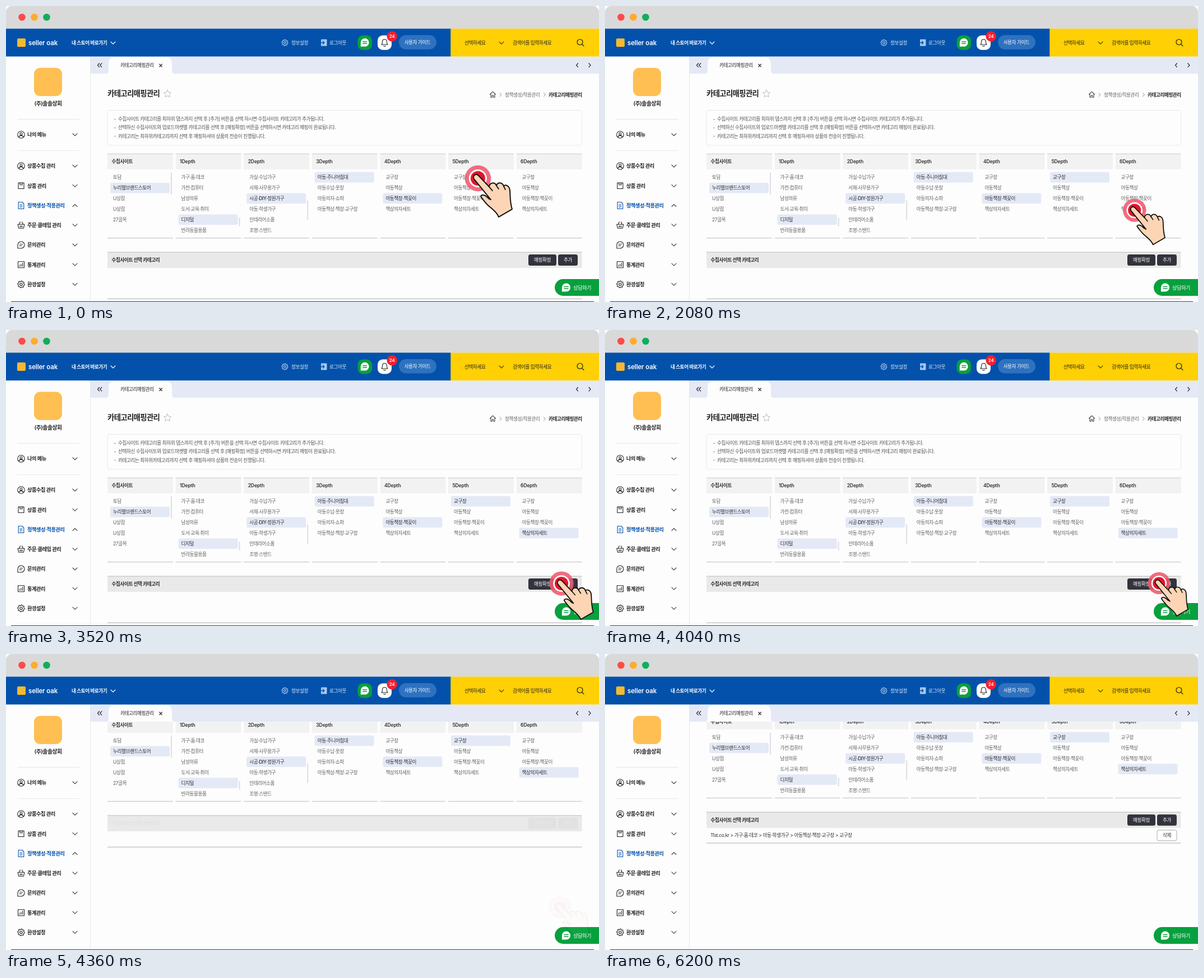
An HTML page that plays this animation: 1058 px wide and 529 px high, repeating every 6.22 s.

```html
<!DOCTYPE html>
<html lang="ko">
<head>
<meta charset="utf-8">
<style>
html, body { margin: 0; width: 100%; height: 100%; overflow: hidden; background: #fff; }
svg { display: block; width: 100vw; height: 100vh; }
text { font-family: Inter, "Noto Sans CJK KR", "Noto Sans KR", "Noto Sans CJK", sans-serif; letter-spacing: -.05em; white-space: pre; }
.line { fill: none; stroke-linecap: round; stroke-linejoin: round; }
</style>
</head>
<body>
<svg id="stage" viewBox="0 0 1058 529"></svg>
<script>
const LOOP = 6220;
const BLUE = '#0351ab', GREEN = '#08a03e', INK = '#222';

// ---------- drawing helpers ----------
const text = (x, y, s, { size = 8.6, fill = INK, weight = 400, anchor = 'start', gap } = {}) =>
  `<text x="${x}" y="${y + size * 0.36}" font-size="${size}" fill="${fill}" font-weight="${weight}" text-anchor="${anchor}"${gap === undefined ? '' : ` style="letter-spacing:${gap}em"`}>${s.replace(/>/g, '&gt;')}</text>`;
const box = (x, y, w, h, fill, r = 0, more = '') =>
  `<rect x="${x}" y="${y}" width="${w}" height="${h}" rx="${r}" fill="${fill}" ${more}/>`;
const dot = (x, y, r, fill, more = '') => `<circle cx="${x}" cy="${y}" r="${r}" fill="${fill}" ${more}/>`;
const line = (d, color = INK, w = 1.1) => `<path class="line" d="${d}" stroke="${color}" stroke-width="${w}"/>`;
const at = (x, y, s) => `<g transform="translate(${x} ${y})">${s}</g>`;
const group = (id, s, more = '') => `<g id="${id}" ${more}>${s}</g>`;
const chevron = (x, y, color, up, w = 4) =>
  line(`M${x - w} ${y + (up ? 2 : -2)}l${w} ${up ? -4 : 4}l${w} ${up ? 4 : -4}`, color);

const gear = (r, color) => {
  const teeth = Array.from({ length: 48 }, (_, i) => {
    const a = i / 48 * 2 * Math.PI, q = r * (i % 6 < 3 ? 1 : 0.8);
    return `${(q * Math.cos(a)).toFixed(2)} ${(q * Math.sin(a)).toFixed(2)}`;
  });
  return line(`M${teeth.join('L')}Z`, color) + dot(0, 0, r * 0.35, 'none', `stroke="${color}" stroke-width="1.1"`);
};

const bubble = (x, y, r) => at(x, y,
  `<path d="M${-r} 0a${r} ${r} 0 1 1 ${r} ${r}H${-r}Z" fill="#fff"/>` +
  line(`M${-r * 0.45} ${-r * 0.2}h${r * 0.9}M${-r * 0.45} ${r * 0.25}h${r * 0.9}`, GREEN, 1.5));

const ring = r => dot(0, 0, r, 'none', `stroke="${INK}" stroke-width="1.1"`);
const icons = {
  user: ring(6.3) + line('M-2-1.5a2 2 0 1 0 4 0a2 2 0 1 0-4 0M-4 4.4c1-4 7-4 8 0'),
  pack: line('M-5-5.2h10v10.4h-10zM-2-5v3.5h4v-3.5'),
  doc: line('M-4.8-6h6.6l3 3v9h-9.6zM-2-1.5h4M-2 1h4M-2 3.5h2.5', BLUE),
  cart: line('M-6-1.5h12l-1.6 7h-8.8zM-3.5-1.5l2-4.5M3.5-1.5l-2-4.5M-2 1v2.5M0 1v2.5M2 1v2.5'),
  talk: line('M-6 0a6 6 0 1 1 6 6h-6zM-2.6-1.3h5.2M-2.6 1.5h3.6'),
  chart: line('M-5.5-5.5h11v11h-11zM-2.7 3v-2.2M0 3v-4M2.7 3v-6'),
  gear: gear(6.2, INK),
};

// ---------- window frame and top bar ----------
const topBar = () =>
  box(0, 0, 1058, 40.5, '#d9d9d9') +
  dot(28.5, 20, 6.3, '#ff4a48') + dot(50.5, 20, 6.3, '#ffab2e') + dot(72.5, 20, 6.3, '#0fae5b') +
  box(0, 40.5, 794, 50, BLUE) + box(793.3, 40.5, 264.7, 50, '#ffd003') +
  box(20, 58, 15, 15, '#f7b92f', 2) +
  text(40, 65.5, 'seller oak', { size: 11.4, fill: '#fff', weight: 600, gap: -0.01 }) +
  text(117, 65.5, '내 스토어 바로가기', { fill: '#fff', weight: 600 }) + chevron(191, 66, '#fff') +
  at(497.5, 65.5, gear(5.4, '#a9c7ec')) + text(509, 65.5, '정보설정', { fill: '#dce8f7' }) +
  box(562, 59.5, 10.5, 12, '#a9c7ec', 1) + line('M560 65.5h8m-2.5-2.5l2.5 2.5l-2.5 2.5', BLUE, 1.3) +
  text(577, 65.5, '로그아웃', { fill: '#dce8f7' }) +
  box(627.5, 52.5, 25.5, 26, GREEN, 9.5) + bubble(640.2, 65.2, 7.4) +
  box(663, 52.5, 25, 26, '#fff', 9) +
  at(675.5, 65.5, line('M-5.5 3.5c1.6-1.4 1.4-3 1.5-5c.3-6 7.7-6 8 0c.1 2-.1 3.6 1.5 5zM-1.7 5.8c.8 1 2.6 1 3.4 0')) +
  dot(688.7, 54.2, 9.2, '#f5202f') + text(688.7, 54.2, '24', { size: 7.8, fill: '#fff', weight: 600, anchor: 'middle', gap: 0 }) +
  box(701, 52, 67, 25.5, '#2e72bf', 12.7) + text(734, 65, '사용자 가이드', { fill: '#fff', weight: 500, anchor: 'middle' }) +
  text(818, 65.5, '선택하세요', { weight: 500 }) + chevron(884, 66, '#554400') +
  text(904, 65.5, '검색어를 입력하세요', { weight: 500 }) +
  dot(1024, 64.5, 5, 'none', `stroke="${INK}" stroke-width="1.2"`) + line('M1027.7 68.3l3.2 3.2', INK, 1.2);

// ---------- sidebar ----------
const menu = [
  [230, 'user', '나의 메뉴'], [286, 'user', '상품수집 관리'], [321.3, 'pack', '상품 관리'],
  [356.5, 'doc', '정책생성·적용관리'], [391.7, 'cart', '주문·클레임 관리'],
  [427, 'talk', '문의관리'], [462.2, 'chart', '통계관리'], [497.4, 'gear', '환경설정'],
];
const sidebar = () =>
  box(0, 90.5, 150, 437.5, '#fdfdfd') + box(150, 90.5, 1, 437.5, '#e8e8ea') +
  box(50, 110.5, 50, 50.5, '#ffbf52', 11) +
  text(75, 174.5, '(주)솔솔상회', { size: 9.8, weight: 600, anchor: 'middle' }) +
  box(20, 202, 111, 0.9, '#e4e4e4') + box(20, 258.3, 111, 0.9, '#e4e4e4') +
  menu.map(([y, icon, label]) => {
    const open = icon === 'doc';
    return at(27, y, icons[icon]) +
      text(38, y, label, { size: 9.2, weight: 600, fill: open ? BLUE : INK }) +
      chevron(123, y, '#444', open);
  }).join('');

const tabs = () =>
  box(151, 90.5, 907, 30.5, '#e4e9f5') +
  '<path d="M178 121q5 0 5-6v-13q0-10.5 10-10.5h93q10 0 10 10.5v13q0 6 5 6z" fill="#fdfdfd"/>' +
  line('M166.5 102.5l-3 3.3l3 3.3M170.7 102.5l-3 3.3l3 3.3', INK, 1.2) +
  text(204, 106, '카테고리매핑관리', { weight: 500 }) +
  line('M273.8 104l4.6 4.6m0-4.6l-4.6 4.6', INK, 1.2) +
  line('M1020.5 102.5l-3 3.3l3 3.3M1040 102.5l3 3.3l-3 3.3', INK, 1.2);

// ---------- page ----------
const starPath = 'M' + Array.from({ length: 10 }, (_, i) => {
  const r = i % 2 ? 3.5 : 7, a = (i * 36 - 90) * Math.PI / 180;
  return `${(r * Math.cos(a)).toFixed(2)} ${(r * Math.sin(a)).toFixed(2)}`;
}).join('L') + 'Z';

const notes = [
  '수집사이트 카테고리를 최하위 뎁스까지 선택 후 [추가] 버튼을 선택 하시면 수집사이트 카테고리가 추가됩니다.',
  '선택하신 수집사이트와 업로드마켓별 카테고리를 선택 후 [매핑확정] 버튼을 선택하시면 카테고리 매핑이 완료됩니다.',
  '카테고리는 최하위카테고리까지 선택 후 매핑하셔야 상품의 전송이 진행됩니다.',
];
const shelf = ['교구장', '아동책상', '아동책장·책꽂이', '책상의자세트'];
const columns = [
  { head: '수집사이트', rows: ['토담', '누리별브랜드스토어', 'U상점', 'U상점', '27골목'], pick: 1, bar: [297, 40] },
  { head: '1Depth', rows: ['가구·홈·데코', '가전·컴퓨터', '남성의류', '도서·교육·취미', '디지털', '반려동물용품'], pick: 4, bar: [378, 16] },
  { head: '2Depth', rows: ['거실·수납가구', '서재·사무용가구', '시공·DIY·정원가구', '아동·학생가구', '인테리어소품', '조명·스탠드'], pick: 2, bar: [347, 35] },
  { head: '3Depth', rows: ['아동·주니어침대', '아동수납·옷장', '아동의자·쇼파', '아동책상·책장·교구장'], pick: 0 },
  { head: '4Depth', rows: shelf, pick: 2 },
  { head: '5Depth', rows: shelf, pick: 0, id: 'pick5' },
  { head: '6Depth', rows: shelf, pick: 3, id: 'pick6' },
];
const rowY = i => 306.3 + i * 18.9;

const column = ({ head, rows, pick, bar, id }, i) => {
  const x = 181 + i * 121.6;
  const chosen = box(x + 5, rowY(pick) - 9.5, 106, 18.7, '#e4e9f6', 3) +
    text(x + 10, rowY(pick), rows[pick], { fill: '#2c2c2c', weight: 500 });
  return box(x, 264, 117, 28, '#f2f2f2') + box(x, 263.7, 117, 1, '#c9c9c9') +
    text(x + 7.5, 278.3, head, { fill: '#333', weight: 600, gap: i ? -0.02 : undefined }) +
    rows.map((r, j) => j === pick && !id ? '' : text(x + 10, rowY(j), r, { fill: '#606060' })).join('') +
    (id ? group(id, chosen) : chosen) +
    (bar ? box(x + 113, bar[0], 2, bar[1], '#dedee2', 1) : '') +
    box(x, 414, 117, 1.3, '#cbcbcb');
};

const button = (x, w, label) => box(x, 444, w, 20, '#32333c', 3.5) +
  text(x + w / 2, 454, label, { fill: '#fff', weight: 500, anchor: 'middle' });

const page = () =>
  text(181, 156.5, '카테고리매핑관리', { size: 13.4, weight: 600 }) +
  at(288, 157, line(starPath, '#b9b9b9', 1)) +
  line('M863.5 158l5-4.8l5 4.8M865 157v6.2h2.3v-3.4h2.4v3.4h2.3v-6.2', '#444') +
  line('M881 155.5l3 3l-3 3M959.5 155.5l3 3l-3 3', '#888', 1) +
  text(890, 158.5, '정책생성/적용관리', { fill: '#666' }) + text(968, 158.5, '카테고리매핑관리', { weight: 600 }) +
  box(181, 186.5, 846.5, 62.5, 'none', 3, 'stroke="#e9e9e9"') +
  notes.map((n, i) => dot(194.5, 202.6 + i * 15.1, 0.8, '#555') + text(200, 202.3 + i * 15.1, n, { fill: '#505050' })).join('') +
  columns.map(column).join('') +
  box(181, 440, 846.5, 28, '#e9e9e9') + box(181, 439.5, 846.5, 1, '#bcbcbc') +
  group('tools', text(188.5, 454, '수집사이트 선택 카테고리', { weight: 600, fill: '#2a2a2a' }) +
    button(932, 50, '매핑확정') + button(985, 35, '추가')) +
  group('result', text(188.5, 481, '11st.co.kr > 가구·홈·데코 > 아동·학생가구 > 아동책상·책장·교구장 > 교구장', { fill: '#333' }) +
    box(985, 472, 35, 19, '#fff', 3, 'stroke="#aaa"') +
    text(1002.5, 481.5, '삭제', { fill: '#333', anchor: 'middle' })) +
  group('rule', box(181, 522.5, 846.5, 1.4, '#c6c6c6'));

const chat = () =>
  '<path d="M1058 488h-64a15 15 0 0 0 0 30h64z" fill="#08a03e"/>' + bubble(999.5, 503, 7.6) +
  text(1012, 503.2, '상담하기', { size: 9.2, fill: '#fff', weight: 500 });

const hand = () =>
  dot(0, 0, 23.3, '#ee5b70', 'opacity=".88"') + dot(0, 0, 16, '#fff') + dot(0, 0, 13, '#e5142c') +
  '<path d="M37 69C33 58 23 54 15 45C11 40 7 36 5 32C7 28 13 29 19 36L23 38L-7 1C-10-4-4-10 1-5L20 15C21 7 30 6 33 13C35 6 44 7 46 14C49 10 56 13 57 21C58 33 57 43 61 55Z" fill="#fdd5b5" stroke="#111" stroke-width="2" stroke-linejoin="round"/>' +
  line('M20 15l6 7M33 13l4 6M46 14l3 6', '#111', 1.8);

const stage = document.getElementById('stage');
stage.innerHTML =
  '<clipPath id="win"><rect width="1058" height="528.5" rx="11"/></clipPath>' +
  '<clipPath id="view"><rect x="151" y="121" width="907" height="407"/></clipPath>' +
  `<g clip-path="url(#win)">${box(0, 0, 1058, 529, '#fdfdfd')}` +
  `<g clip-path="url(#view)">${group('page', page())}</g>` +
  topBar() + sidebar() + tabs() + chat() + group('hand', hand()) + '</g>' +
  box(9, 528, 1040, 1, '#3a3a3a');

// ---------- motion ----------
// Each track: start value, then [start ms, length ms, next value].
const tracks = {
  size: [1, [20, 300, 0.85], [2030, 300, 1], [2400, 300, 0.85], [3412, 300, 1], [3730, 300, 0.85]],
  x: [837, [1300, 400, 943.4], [2800, 350, 988.4]],
  y: [307, [1300, 400, 364.7], [2800, 350, 452.5]],
  pick5: [0, [20, 300, 1]],
  pick6: [0, [2400, 300, 1]],
  scroll: [0, [4077, 333, 1]],
  result: [0, [4900, 300, 1]],
};
const ease = p => 1 - Math.pow(1 - p, 1.7);
const value = (name, t) => {
  const [first, ...steps] = tracks[name];
  return steps.reduce((v, [start, len, next]) =>
    v + (next - v) * ease(Math.min(1, Math.max(0, (t - start) / len))), first);
};

const el = id => document.getElementById(id);
const parts = Object.fromEntries(['page', 'hand', 'pick5', 'pick6', 'tools', 'result', 'rule'].map(id => [id, el(id)]));
const fade = (id, v) => parts[id].setAttribute('opacity', v.toFixed(3));
const move = (id, x, y, s = 1) => parts[id].setAttribute('transform', `translate(${x} ${y}) scale(${s})`);

function draw(t) {
  const v = name => value(name, t);
  const scroll = v('scroll'), size = v('size'), result = v('result');
  move('page', 0, -157.3 * scroll);
  move('rule', 0, -28 * scroll);
  move('hand', v('x') + (size - 0.85) * 33, v('y') + (size - 0.85) * 7, size);
  fade('hand', 1 - scroll);
  fade('tools', Math.max(1 - scroll, result));
  fade('result', result);
  fade('pick5', v('pick5'));
  fade('pick6', v('pick6'));
}

const begin = performance.now();
function tick() {
  draw((performance.now() - begin) % LOOP);
  requestAnimationFrame(tick);
}
draw(0);
requestAnimationFrame(tick);
</script>
</body>
</html>
```
